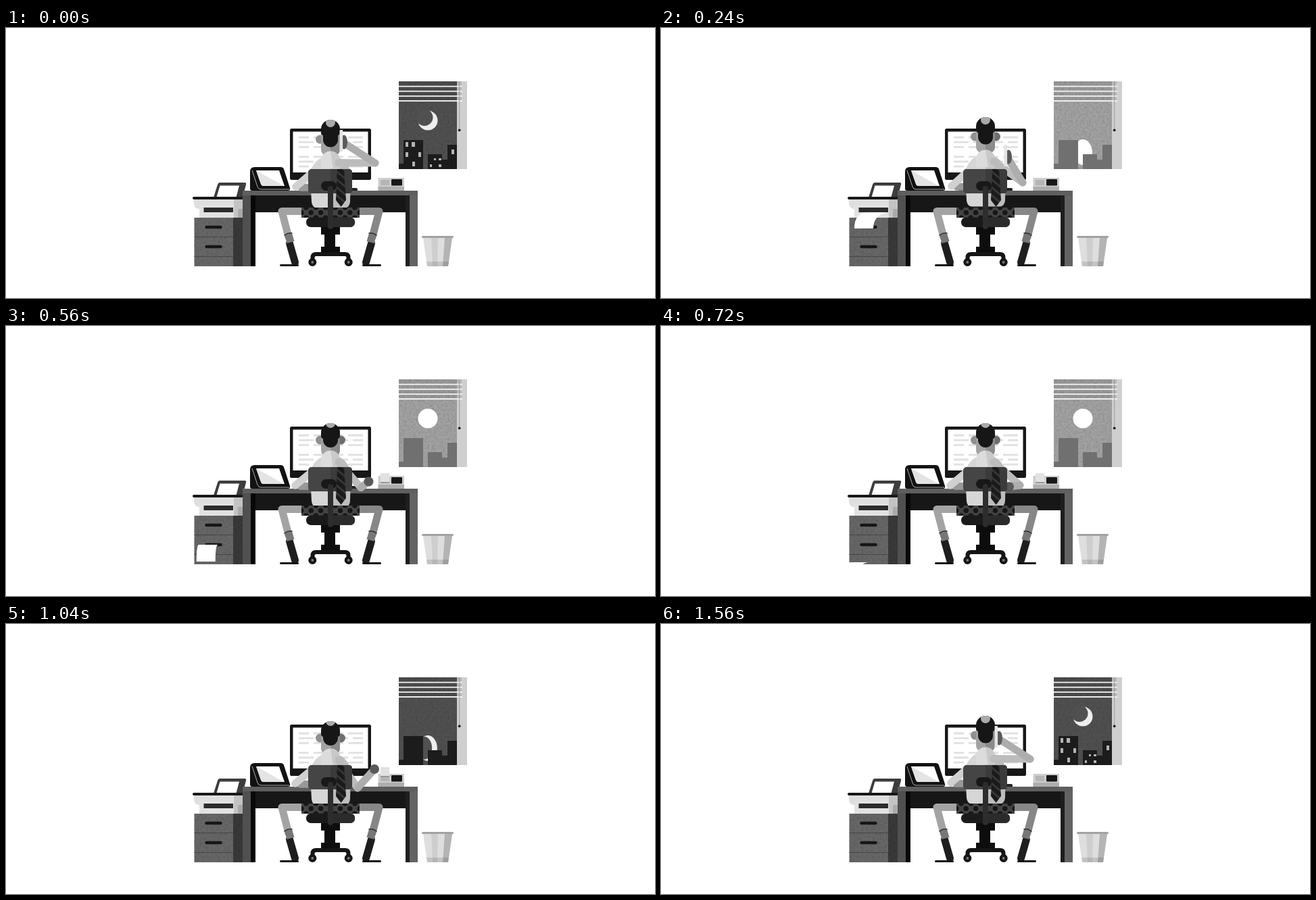
An HTML page that plays this animation: 960x400 px, repeating every 1600 ms.

```html
<!DOCTYPE html>
<html lang="en">
<head>
<meta charset="utf-8">
<title>Late shift</title>
<style>
html, body { margin: 0; width: 100%; height: 100%; overflow: hidden; background: #fff; }
svg { display: block; width: 960px; height: 400px; }
.limb { fill: none; stroke-width: 11; stroke-linecap: round; stroke-linejoin: round; }
.round { fill: none; stroke-linecap: round; }
</style>
</head>
<body>
<svg viewBox="0 0 960 400" xmlns="http://www.w3.org/2000/svg">
  <defs>
    <clipPath id="paneClip"><rect x="581" y="79" width="86" height="130"/></clipPath>
    <clipPath id="hairClip"><path id="hairShape"/></clipPath>
    <filter id="grain" x="0" y="0" width="1" height="1">
      <feTurbulence type="fractalNoise" baseFrequency=".3" numOctaves="3" seed="4"/>
      <feColorMatrix values="0 0 0 0 0  0 0 0 0 0  0 0 0 0 0  .25 0 0 0 -.09"/>
    </filter>
    <pattern id="dots" x="472.800" y="266" width="14.400" height="15" patternUnits="userSpaceOnUse">
      <rect width="15" height="15" fill="#444"/>
      <path d="M0 0h0M14.400 0h0M0 15h0M14.400 15h0M7.200 7.500h0" stroke="#161616" stroke-width="7.500" stroke-linecap="round"/>
    </pattern>
    <pattern id="stripes" width="9" height="9" patternUnits="userSpaceOnUse" patternTransform="rotate(40)">
      <rect width="9" height="9" fill="#1a1a1a"/>
      <rect width="9" height="3" fill="#363636"/>
    </pattern>
    <pattern id="blinds" x="581" y="85.600" width="94" height="7.170" patternUnits="userSpaceOnUse">
      <rect width="94" height="1.800" fill="#f4f4f4"/>
    </pattern>
  </defs>

  <!-- window -->
  <g clip-path="url(#paneClip)">
    <rect id="pane" x="581" y="79" width="86" height="130"/>
    <rect x="581" y="79" width="86" height="130" filter="url(#grain)"/>
    <ellipse id="disc"/>
    <ellipse id="bite"/>
    <path id="city" d="M581 209v-8h7v-35h29v43zM624 209v-22h21v8h8v-22h14v36z"/>
    <path id="lights" fill="#b4b4b4" d="M591 169h4v7h-4zM600 169h5v7h-5zM591 184h4v7h-4zM610 184h4v7h-4zM601 198h4v7h-4zM633 193h3v3h-3zM640 193h4v3h-4zM627 202h3v4h-3zM640 202h4v4h-4zM659 180h4v7h-4z"/>
    <rect x="581" y="79" width="86" height="29" fill="#000" opacity=".05"/>
  </g>
  <rect x="667" y="79" width="15" height="130" fill="#cfcfcf"/>
  <rect x="667" y="79" width="7" height="29" fill="#b9b9b9"/>
  <rect x="581" y="85" width="94" height="24" fill="url(#blinds)"/>
  <path d="M670.700 79v71" stroke="#8c8c8c" stroke-width=".8"/>
  <circle cx="670.700" cy="151.300" r="1.900" fill="#1c1c1c"/>

  <!-- cabinet and printer -->
  <rect x="278.500" y="281" width="71.500" height="72" fill="#676767"/>
  <rect x="336" y="281" width="14" height="72" fill="#393939"/>
  <path d="M278.500 309.500h57.500M278.500 338.500h57.500" stroke="#484848"/>
  <rect x="278.500" y="281" width="71.500" height="72" filter="url(#grain)"/>
  <path class="round" d="M296.500 295h21M296.500 324h21" stroke="#161616" stroke-width="4.400"/>
  <path d="M316 229h37q3 0 2 3l-5 19h-43l6-19q1-3 3-3" fill="#3d3d3d"/>
  <path d="M316.500 233.500h28.500l-4.500 17h-29z" fill="#fff"/>
  <path d="M278 253h72v15h-64q-8 0-8-9z" fill="#dfdfdf"/>
  <rect x="337" y="253" width="13" height="28" fill="#c3c3c3"/>
  <rect x="286" y="262" width="51" height="19" fill="#e2e2e2"/>
  <rect x="343" y="268" width="7" height="13" fill="#aaa"/>
  <path class="round" d="M278 252h71" stroke="#181818" stroke-width="4"/>
  <rect x="292.500" y="266" width="43.500" height="7" fill="#2c2c2c"/>
  <path id="paper" fill="#fff"/>

  <!-- monitor -->
  <rect x="440" y="237" width="80" height="5" rx="2" fill="#222"/>
  <rect x="420" y="149" width="120" height="76" rx="2.500" fill="#171717"/>
  <rect x="424.500" y="153.500" width="111" height="60.500" fill="#fff"/>
  <g id="lines" stroke="#e0e0e0" stroke-width="2.800"></g>

  <!-- desk -->
  <rect x="362" y="248" width="235" height="25" fill="#171717"/>
  <rect x="350" y="241" width="259" height="7" fill="#5e5e5e"/>
  <rect x="350" y="248" width="12" height="105" fill="#505050"/>
  <rect x="362" y="248" width="7" height="105" fill="#080808"/>
  <rect x="591" y="248" width="6" height="105" fill="#1e1e1e"/>
  <rect x="597" y="248" width="12" height="105" fill="#636363"/>

  <!-- tablet -->
  <path d="M368 206h38q4 0 5 3l9 28q1 4-3 4h-53q-3 0-3-3v-25q0-7 7-7" fill="#121212"/>
  <path d="M364 211l8 24q1 4 5 4h42" fill="none" stroke="#aaa"/>
  <path d="M370 211h34l8 23h-31q-3 0-4-3z" fill="#fff"/>
  <path d="M370 211l41 23h-30q-3 0-4-3z" fill="#e4e4e4"/>

  <!-- desk phone -->
  <rect x="550.500" y="222" width="38.500" height="19" fill="#cecece"/>
  <rect x="550.500" y="235" width="38.500" height="6" fill="#aeaeae"/>
  <rect x="554" y="225" width="13" height="8" fill="#b5b5b5"/>
  <rect x="570" y="224" width="16" height="9.500" rx="1" fill="#171717"/>
  <g id="docked">
    <rect x="554" y="218" width="13" height="13" fill="#e1e1e1"/>
    <rect x="554" y="231" width="13" height="2" fill="#999"/>
  </g>

  <!-- bin -->
  <path d="M617 311h43l-6 42h-31z" fill="#dedede"/>
  <path d="M629 311h10l-1 42h-7z" fill="#cecece"/>
  <path d="M649 311h11l-6 42h-8z" fill="#b4b4b4"/>
  <path d="M622 346h33l-1 7h-31z" fill="#000" opacity=".12"/>
  <path class="round" d="M616.500 309.500h44" stroke="#a2a2a2" stroke-width="3"/>

  <!-- legs -->
  <g id="leg">
    <path class="limb" d="M440 271.500h-32l10 38" stroke="currentColor"/>
    <path class="limb" d="M419.500 319l8 28" stroke="#1e1e1e"/>
    <path d="M412 307l11-3 3.500 12-11 3z" fill="#777"/>
    <path d="M412 307q5-4 11-3" fill="none" stroke="#2a2a2a" stroke-width="1.500"/>
    <path class="round" d="M406.500 351.500h25" stroke="#121212" stroke-width="3"/>
  </g>
  <use href="#leg" transform="matrix(-1 0 0 1 960 0)" color="#878787"/>

  <!-- upper body -->
  <path id="leftFore" class="limb" stroke="#989898"/>
  <path id="leftArm" class="limb" stroke="#d0d0d0"/>
  <g id="torso">
    <path d="M480 190c-18 0-30 14-30 30l2 38q1 9 8 9h20z" fill="#d6d6d6"/>
    <path d="M480 190c18 0 30 14 30 30l-1 38q-1 9-8 9h-21z" fill="#bdbdbd"/>
  </g>
  <g id="head">
    <circle cx="464.500" r="6.500" fill="#8f8f8f"/>
    <circle cx="495.500" r="6.500" fill="#6e6e6e"/>
    <path d="M466-14h28v28q0 11-14 11t-14-11z" fill="#a3a3a3"/>
    <path d="M480-14h14v28q0 11-14 11z" fill="#8b8b8b"/>
    <path id="hair" fill="#161616"/>
    <g clip-path="url(#hairClip)"><circle id="spot" cx="480" r="7" fill="#aaa"/></g>
  </g>
  <g id="collar">
    <path d="M466 202v-5a14 14 0 0 1 28 0v12h-28z" fill="#dcdcdc"/>
    <path d="M480 183a14 14 0 0 1 14 14v12h-10z" fill="#c9c9c9"/>
  </g>
  <path id="upper" class="limb" stroke="#bcbcbc"/>
  <path id="fore" class="limb" stroke="#adadad"/>
  <g id="hand">
    <ellipse id="fist" fill="#595959"/>
    <rect id="handset" x="-4.500" y="-18" width="4.600" height="32" rx="1" fill="#e4e4e4"/>
  </g>

  <!-- shorts and chair -->
  <rect x="437" y="266" width="86" height="15" fill="url(#dots)"/>
  <rect x="447" y="209" width="65" height="36" rx="5" fill="#454545"/>
  <path d="M480 209h27q5 0 5 5v26q0 5-5 5h-27z" fill="#3b3b3b"/>
  <path d="M490 209h10l3 46-7.500 10-7.500-10z" fill="url(#stripes)"/>
  <rect x="444" y="280.500" width="72" height="14.500" rx="7" fill="#1a1a1a"/>
  <path d="M480 280.500h29a7 7 0 0 1 0 14.500h-29z" fill="#2b2b2b"/>
  <path d="M466 295h28v11h-7v18h7v8h-28v-8h5v-18h-5z" fill="#0d0d0d"/>
  <path d="M453.500 345v-5q0-5 5-5h43q5 0 5 5v5" fill="none" stroke="#151515" stroke-width="6"/>
  <rect x="466" y="227" width="23" height="14" rx="7" fill="#181818"/>
  <path class="round" d="M480 238v56" stroke="#2d2d2d" stroke-width="8"/>
  <path class="round" d="M453.300 347h0M506.700 347h0" stroke="#151515" stroke-width="12"/>
  <path class="round" d="M453.300 347h0M506.700 347h0" stroke="#777" stroke-width="4"/>
</svg>

<script>
const LOOP = 1600, STEP = 40;
const el = id => document.getElementById(id);
const set = (id, attrs) => {
  for (const k in attrs) el(id).setAttribute(k, attrs[k]);
};
const show = (id, on) => set(id, { visibility: on ? 'visible' : 'hidden' });
const shift = (id, x, y) => set(id, { transform: `translate(${x} ${y})` });
const grey = v => `rgb(${[v, v, v].map(Math.round)})`;
const ramp = (t, from, to) => Math.min(1, Math.max(0, (t - from) / (to - from)));
const bump = (t, peak, width) => Math.max(0, 1 - Math.abs(t - peak) / width);

// Monotone cubic through rows of [time, ...values].
function track(...rows) {
  const last = rows.length - 1;
  const slope = (i, c) => i < 0 || i >= last ? 0
    : (rows[i + 1][c] - rows[i][c]) / (rows[i + 1][0] - rows[i][0]);
  const tangent = (i, c) => {
    const a = slope(i - 1, c), b = slope(i, c);
    return a * b > 0 ? 2 * a * b / (a + b) : 0;
  };
  return time => {
    const t = Math.min(Math.max(time, rows[0][0]), rows[last][0]);
    const i = Math.max(0, rows.findIndex(r => r[0] >= t) - 1);
    const a = rows[i], b = rows[i + 1], h = b[0] - a[0], u = (t - a[0]) / h, w = 1 - u;
    return a.slice(1).map((v, k) => {
      const c = k + 1;
      return v * w * w * (1 + 2 * u) + b[c] * u * u * (3 - 2 * u)
        + h * u * w * (w * tangent(i, c) - u * tangent(i + 1, c));
    });
  };
}

// elbow x, y, hand x, y, ear height, nod
const call = [546, 200, 498, 169, 165, 0];
const raise = [535, 229, 512, 191, 161, 0];
const reach = [520, 243, 545, 215, 169, 1];
const dial = [519, 243, 558, 223, 169, 1];
const type = [531, 236, 515, 238, 169, 1];
const pose = track([40, ...call], [240, ...raise], [400, ...dial], [480, ...dial],
  [640, ...type], [880, ...type], [1040, ...reach], [1160, ...dial], [1300, ...dial],
  [1440, ...raise], [1560, ...call]);

// left, top, bottom, lean
const sheet = track([40, 300, 273, 273, 0], [240, 286, 273, 297, 20],
  [400, 286, 288, 339, 0], [720, 271, 350, 353, 7], [840, 236, 350, 353, 7]);

function drawLines() {
  for (let row = 0; row < 7; row++) {
    if (row === 3) continue;
    const dash = row % 4 === 1 ? '22 7 15 7' : '15 7 22 7';
    el('lines').innerHTML += `<path d="M433 ${162 + row * 7.2}h95" stroke-dasharray="${dash}"/>`;
  }
}

function drawWindow(t) {
  const day = ramp(t, 40, 200) - ramp(t, 820, 1000);
  const lit = 1 - ramp(t, 40, 120) + ramp(t, 1120, 1240);
  const sky = grey(80 + 82 * day);
  const moon = t < 160 || t >= 960;

  // Sun and moon swap places twice per loop: quick drop, springy rise.
  const u = t % 800;
  const up = u < 160 ? 1 - ramp(u, 40, 160) ** 2 : ramp(u, 160, 430);
  const cy = 137 + 95 * (1 - up) ** 2;
  const rx = 14.5 - 10 * up * up * (1 - up), ry = 14.5 + 5.3 * Math.sqrt(1 - up);

  set('pane', { fill: sky });
  set('city', { fill: grey(28 + 84 * day) });
  set('lights', { opacity: lit });
  set('disc', { cx: 624, cy, rx, ry, fill: moon ? '#eee' : '#fff' });
  set('bite', { cx: 618 + up, cy: cy - 4.5 * up * up, rx: rx - 2, ry: ry - 2, fill: sky });
  show('bite', moon);
}

function drawMan(t) {
  const [ex, ey, hx, hy, ear, nod] = pose(t);
  const top = 4 * nod - 29;
  const hair = `M466 ${top + 14}a14 14 0 0 1 28 0v5q0 3-3 4v${6.5 - 4.5 * nod}a11 11 0 0 1-22 0V${top + 23}q-3-1-3-4z`;
  const lift = (ear - 166) / 2;
  shift('head', 0, ear + 2 * bump(t, 400, 120));
  set('hair', { d: hair });
  set('hairShape', { d: hair });
  set('spot', { cy: top + 4 - 4 * nod });
  shift('torso', 0, lift);
  shift('collar', 0, lift);

  const sy = 200 + lift, lx = 428.5 - lift / 2, ly = 235.5 + lift / 2;
  const wristX = hx + (ex - hx) * .13, wristY = hy + (ey - hy) * .13;
  set('leftArm', { d: `M470 ${sy}L${lx} ${ly}` });
  set('leftFore', { d: `M${lx + 8} ${ly + 1}H450` });
  set('upper', { d: `M492 ${sy}L${ex} ${ey}` });
  set('fore', { d: `M${ex} ${ey}L${wristX} ${wristY}` });

  const held = t < 360 || t >= 1320;
  shift('hand', hx, hy);
  set('fist', held ? { cx: 2, rx: 5, ry: 10.5 } : { cx: 0, rx: 7, ry: 7 });
  show('handset', held);
  show('docked', !held);
  shift('docked', 0, -6 * bump(t, 1040, 80));
}

function drawPaper(t) {
  const [left, top, bottom, lean] = sheet(t), right = left + 28;
  set('paper', {
    d: `M${left + lean} ${top}h28Q${right} ${top + lean / 4} ${right} ${bottom}H${left}Q${left} ${top} ${left + lean} ${top}z`
  });
  show('paper', t > 40 && t < 840);
}

const start = performance.now();
function tick() {
  const elapsed = performance.now() - start + .5;
  const t = Math.floor(elapsed % LOOP / STEP) * STEP;
  drawWindow(t);
  drawMan(t);
  drawPaper(t);
  requestAnimationFrame(tick);
}
set('leg', { style: 'stroke-linecap: round' });
el('leg').parentNode.style.color = '#a3a3a3';
drawLines();
tick();
</script>
</body>
</html>
```
